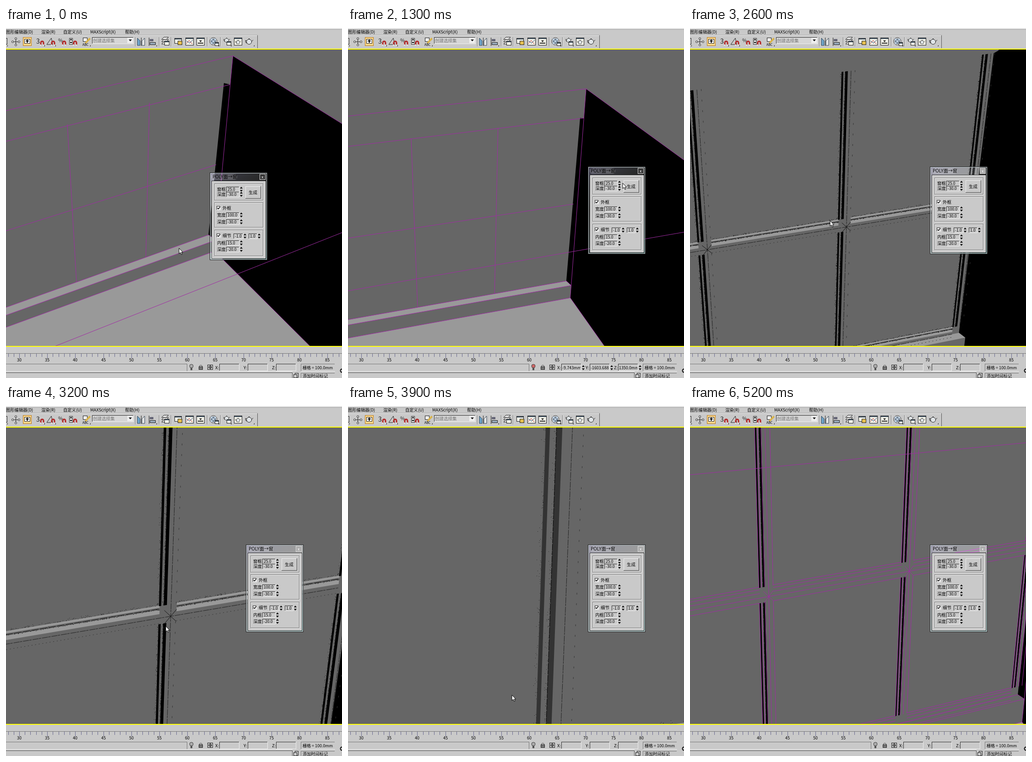
An HTML page with a canvas that plays this animation: 734 px wide and 763 px high, repeating every 5.3 s.

```html
<!DOCTYPE html>
<html>
<head>
<meta charset="utf-8">
<style>
html, body { margin: 0; width: 100%; height: 100%; overflow: hidden; background: #c9c9c9; }
canvas { display: block; }
</style>
</head>
<body>
<canvas id="stage" width="734" height="763"></canvas>
<script>
const c = document.getElementById('stage').getContext('2d');
const LOOP = 5300, BUILT = 1700, DESELECTED = 2400, EDGES_ON = 4900;
const PURPLE = '#a02ca4', FACE = '#c9c9c9', WALL = '#666', LIGHT = '#999', INK = '#222';
const FONT = '"Noto Sans CJK SC", "Noto Sans CJK", "Noto Sans", sans-serif';

// Window corners TL, TR, BL, BR on screen, then the guide line's height at both stage edges
const views = [
  [134,210, 476,120, 154,554, 445,450, 736,446],
  [128,209, 512,189, 142,600, 489,569, 411,360],
  [138,241, 507,196, 152,609, 480,551, 573,445],
  [-108,28, 820,-86, -38,929, 705,776, 573,445],
  [-478,-130, 1412,-330, -358,1750, 1172,1480, 150,80],
  [250,16, 1030,-4, 252,739, 930,722, 150,80],
  [163,10, 790,-55, 180,760, 721,628, 150,80]
];
const camera = [[0,0],[700,1],[900,1],[1250,2],[2000,2],[3200,3],[3900,4],[4500,5],[5200,6]]
  .map(([t, i]) => [t, ...views[i]]);
const pointer = [[0,378,480],[700,487,327],[900,566,314],[1500,617,350],[1700,617,350],
  [2000,262,359],[3200,349,480],[3900,358,630],[4500,319,416],[LOOP,319,416]];

const clamp = (v, a = 0, b = 1) => Math.min(b, Math.max(a, v));

function sample(keys, t) {
  let i = 0;
  while (i < keys.length - 2 && keys[i + 1][0] <= t) i++;
  const a = keys[i], b = keys[i + 1], k = clamp((t - a[0]) / (b[0] - a[0]));
  return a.slice(1).map((v, j) => v + (b[j + 1] - v) * k);
}

// Maps plane coordinates (u 0..2, v -1..1) onto the screen quad
function projector([x0, y0, x1, y1, x3, y3, x2, y2]) {
  const dx1 = x1 - x2, dx2 = x3 - x2, sx = x0 - x1 + x2 - x3;
  const dy1 = y1 - y2, dy2 = y3 - y2, sy = y0 - y1 + y2 - y3;
  const det = dx1 * dy2 - dx2 * dy1;
  const g = (sx * dy2 - dx2 * sy) / det, h = (dx1 * sy - sx * dy1) / det;
  return (u, v) => {
    const a = u / 2, b = (v + 1) / 2, w = g * a + h * b + 1;
    return [((x1 - x0 + g * x1) * a + (x3 - x0 + h * x3) * b + x0) / w,
            ((y1 - y0 + g * y1) * a + (y3 - y0 + h * y3) * b + y0) / w];
  };
}

function trace(pts) {
  c.beginPath();
  pts.forEach(p => c.lineTo(p[0], p[1]));
}
function fill(color, ...pts) { trace(pts); c.fillStyle = color; c.fill(); }
function line(color, dash, ...pts) {
  trace(pts);
  c.setLineDash(dash); c.strokeStyle = color; c.lineWidth = 1; c.stroke(); c.setLineDash([]);
}
function circle(x, y, r, color, stroke) {
  c.beginPath(); c.arc(x, y, r, 0, 7);
  if (color) { c.fillStyle = color; c.fill(); }
  if (stroke) { c.lineWidth = 1; c.strokeStyle = stroke; c.stroke(); }
}
function rect(color, x, y, w, h) { c.fillStyle = color; c.fillRect(x, y, w, h); }
function frame(color, x, y, w, h) { c.strokeStyle = color; c.lineWidth = 1; c.strokeRect(x + .5, y + .5, w - 1, h - 1); }
function box(color, x, y, w, h) { rect(color, x, y, w, h); frame(INK, x, y, w, h); }
function text(s, x, y, size = 9, color = '#000') {
  c.font = size + 'px ' + FONT; c.fillStyle = color; c.fillText(s, x, y);
}
function sunken(x, y, w, h, color = FACE) {
  rect('#eee', x, y, w + 1, h + 1); rect('#333', x, y, w, h); rect(color, x + 1, y + 1, w - 1, h - 1);
}
function place(x, y, paint) {
  c.save(); c.translate(Math.round(x), Math.round(y)); paint(); c.restore();
}

function drawBar(at, spans, vertical, s) {
  const along = (color, o, a, b, dash = []) => line(color, dash, at(o, a), at(o, b));
  const strip = (color, o, w, a, b) => fill(color, at(o, a), at(o + w, a), at(o + w, b), at(o, b));
  for (const [a, b] of spans) {
    if (vertical) {
      strip(s.shade, -.064, s.width * .75, a, b);
      strip(s.shade, -.038, s.width, a, b);
      along('#000', -.038, a, b, [9, 2, 14, 1]);
    } else if (s.lit) {
      strip(LIGHT, -.063, .011, a, b);
      strip(LIGHT, -.041, .021, a, b);
      along('#111', -.046, a, b, [16, 3]);
    } else if (!s.wire) {
      along(LIGHT, -.052, a, b, [28, 15]);
      along('#111', -.032, a, b, [17, 5]);
      along('#111', .034, a, b, [20, 14]);
    }
    if (s.wire) [-.064, -.048, -.026, .03].forEach(o => along(PURPLE, o, a, b));
    else along('#333', .027, a, b, vertical ? [4, 19] : [2, 6]);
    if (s.selected) along('#fff', -.066, a, b, [12, 2, 5, 2]);
    if (s.lit && !s.wire) speckle(at, a, b);
  }
  along(s.wire ? PURPLE : INK, 0, spans[0][0], spans[spans.length - 1][1], s.wire ? [] : [13, 1, 5, 2]);
}

function speckle(at, a, b) {
  let seed = 91;
  const random = () => (seed = seed * 16807 % 2147483647) / 2147483647;
  for (let i = 0; i < 260; i++) {
    const [x, y] = at((i % 2 ? -.064 : -.04) - random() * random() * .012, a + (b - a) * random());
    rect(INK, x | 0, y | 0, 1, 1);
  }
}

function drawView(t) {
  const v = sample(camera, t), at = projector(v);
  const tilt = (v[3] - v[1]) / (v[2] - v[0]);
  const grey = clamp((v[2] - v[0] - 1000) / 17, 0, 51);
  const s = { width: .13 * Math.abs(tilt), shade: `rgb(${grey},${grey},${grey})`, lit: t < 4300,
    wire: t < DESELECTED || t >= EDGES_ON, selected: t >= BUILT && t < DESELECTED };

  // Depth lines meet at a vanishing point that follows the camera tilt
  const vanish = [245 + 3786 * tilt, -135 + 2196 * tilt];
  const toward = (p, k) => p.map((n, i) => n + (n - vanish[i]) * k);
  const front = (u, v) => toward(at(u, v), .0108);
  const far = -1.6;
  const top = front(2, -1.34), notch = front(2, -1.03), lip = front(2, 1), foot = front(2, 1.17);
  const back = toward(top, 4), floor = toward(foot, 4);
  const jamb = 1.98, jambTop = at(2, -1), jambEnd = at(jamb, 1);

  c.save();
  c.beginPath(); c.rect(0, 47, 734, 646); c.clip();
  rect(WALL, 0, 47, 734, 646);
  fill(LIGHT, front(far, 1.17), foot, floor, [-600, floor[1]]);
  fill('#000', top, back, floor, foot, lip, jambEnd, jambTop, notch);
  if (s.lit) fill(LIGHT, at(far, 1), jambEnd, lip, front(far, 1));

  if (t >= BUILT) {
    const across = [[far, -.06], [.03, .94], [1.03, 1.92]];
    const up = [[-1, -.06], [.03, .94]];
    for (const y of [0, 1]) drawBar((o, a) => at(a, y + o), across, false, s);
    for (const x of [0, 1, jamb]) drawBar((o, a) => at(x + o, a), up, true, s);
    for (const x of [0, 1]) for (const side of [-1, 1])
      line(s.wire ? PURPLE : '#111', [], at(x - .035, -.035 * side), at(x + .03, .03 * side));
  } else {
    for (const x of [0, 1]) line(PURPLE, [], at(x, -1), at(x, 1));
    line(PURPLE, [], at(far, 0), at(2, 0));
  }
  if (s.wire) [
    [at(far, -1.3), top, back], [at(far, -1), notch], [top, notch, lip, foot, floor],
    [at(far, 1), jambEnd, lip], [front(far, 1), lip], [front(far, 1.17), foot],
    [[0, v[8]], [734, v[9]]]
  ].forEach(path => line(PURPLE, [], ...path));
  if (s.selected) place(...at(0, 0), drawGizmo);
  c.restore();
}

function drawGizmo() {
  const arrow = (color, name, x, y) => {
    const n = Math.hypot(x, y), dx = x / n, dy = y / n, bx = x - dx * 18, by = y - dy * 18;
    line(color, [], [-3, 3], [bx, by]);
    fill(color, [x, y], [bx - dy * 4, by + dx * 4], [bx + dy * 4, by - dx * 4]);
    text(name, x + dx * 4 - 3, y + dy * 4 + 2, 9, color);
  };
  fill('#a69b4a', [-24, 4], [3, 2], [7, 12], [-18, 15]);
  line('#e8d800', [], [-60, 7], [3, 2], [7, 12], [-18, 15], [-24, 4]);
  line('#d00', [], [-24, 3], [-24, -17]);
  line('#00e', [], [-24, -17], [-1, -22], [7, -5]);
  arrow('#00e', 'z', -2, -66); arrow('#c00', 'x', -71, 9); arrow('#090', 'y', 22, 34);
}

function spinner(x, y) {
  fill('#111', [x, y + 4], [x + 3, y], [x + 6, y + 4]);
  fill('#111', [x, y + 7], [x + 3, y + 11], [x + 6, y + 7]);
}
function field(value, x, y, w = 28) {
  sunken(x, y, w, 11);
  text(value, x + 3, y + 9, 8.5);
  spinner(x + w + 2, y);
}
function row(label, value, y) { text(label, 16, y + 9, 9.5); field(value, 36, y); }
function check(label, y) {
  sunken(15, y, 8, 8, '#e8e8e8');
  line('#000', [], [17, y + 4], [19, y + 6], [23, y + 1]);
  line('#000', [], [17, y + 5], [19, y + 7], [23, y + 2]);
  text(label, 28, y + 8, 9.5);
}
function drawDialog(t) {
  c.globalCompositeOperation = 'color-dodge';
  rect('#444', 0, 0, 126, 191);
  c.globalCompositeOperation = 'source-over';
  rect('rgba(255,255,255,.15)', 0, 0, 126, 191);
  const tint = c.createLinearGradient(0, 0, 126, 191);
  tint.addColorStop(0, 'rgba(150,140,225,.25)');
  tint.addColorStop(.35, 'rgba(130,150,160,0)');
  tint.addColorStop(1, 'rgba(90,200,190,.4)');
  rect(tint, 0, 0, 126, 191);
  frame(INK, 0, 0, 126, 191); frame('#bfc9cc', 1, 1, 124, 189);
  c.fillStyle = 'rgba(255,255,255,.2)';
  c.beginPath(); c.roundRect(4, 3, 56, 13, 6); c.fill();
  text('POLY面→窗', 6, 13, 10);
  rect(t < DESELECTED ? '#333' : '#aaa', 109, 4, 12, 11); frame('#ddd', 109, 3, 13, 13);
  text('x', 113, 13, 9, '#fff');
  rect('#333', 4, 18, 119, 170); rect('#eee', 5, 19, 117, 168); rect(FACE, 6, 20, 115, 166);
  for (const [y, h] of [[24, 37], [65, 55], [125, 57]]) {
    frame('#eee', 11, y + 1, 107, h); frame('#777', 10, y, 107, h);
  }
  row('窗框', '25.0', 31); row('深度', '-30.0', 42);
  rect('#444', 78, 30, 34, 27); rect('#eee', 78, 30, 33, 26); rect(FACE, 79, 31, 32, 25);
  text('生成', 85, 47, 9.5);
  check('外框', 73); row('宽度', '100.0', 87); row('深度', '-30.0', 102);
  check('细节', 133); field('-1.0', 52, 133, 20); field('1.0', 85, 133, 18);
  row('内框', '15.0', 148); row('深度', '-20.0', 162);
}

function magnet(x) {
  const y = 32;
  c.lineWidth = 3; c.strokeStyle = '#b22a2a';
  c.beginPath(); c.moveTo(x - 3, y + 5); c.arc(x, y, 3, Math.PI, 0); c.lineTo(x + 3, y + 5); c.stroke();
  for (const side of [-3, 3]) rect('#eee', x + side - 2, y + 4, 3, 2);
}
function teapot(x, y, s) {
  place(x, y, () => {
    c.scale(s, s);
    circle(0, 0, 5.5, '#e0e5e8', INK);
    line(INK, [], [5, 0], [9, -4]);
    line(INK, [], [-5, -2], [-8, -3], [-7, 2], [-4, 3]);
    rect(INK, -1, -7, 2, 2);
  });
}
function panel(x, y = 21, w = 18, h = 17) { box('#f2f2e8', x, y, w, h); rect('#456', x + 1, y + 1, w - 2, 2); }
function drawToolbar() {
  rect(FACE, 0, 0, 734, 47);
  rect('#eee', 0, 0, 734, 2); rect('#b5b5b5', 0, 2, 734, 2);
  [['图形编辑器(D)', 0], ['渲染(R)', 77], ['自定义(U)', 125], ['MAXScript(X)', 184], ['帮助(H)', 260]]
    .forEach(([s, x]) => text(s, x, 12, 9.3));
  rect('#aaa', 0, 15, 550, 1); rect('#eee', 0, 16, 550, 1); rect('#555', 549, 16, 1, 28);
  for (const x of [282, 334, 360, 439, 468]) { rect('#777', x, 20, 1, 20); rect('#eee', x + 1, 20, 1, 20); }
  for (const x of [2, 83, 107, 183, 328, 464, 491, 541]) fill(INK, [x, 40], [x + 2, 37], [x + 2, 40]);

  frame('#333', -6, 22, 9, 14);
  line(INK, [], [14, 30], [29, 30]); line(INK, [], [21.5, 23], [21.5, 37]);
  for (let i = 0; i < 4; i++) circle(21.5 + 7 * Math.cos(i * Math.PI / 2), 30 + 7 * Math.sin(i * Math.PI / 2), 2, '#eee', INK);
  rect('#ffd88a', 37, 20, 19, 19); frame('#b5781c', 37, 20, 19, 19);
  box('#fff', 40, 24, 13, 10);
  fill(INK, [46.5, 25], [51, 29], [42, 29]); rect(INK, 45, 29, 3, 3);
  text('3', 66, 34, 14, INK); text('%', 114, 31, 11, INK);
  line(INK, [], [89, 36], [99, 22], [102, 36], [89, 36]);
  box('#fff', 138, 22, 8, 14); spinner(139, 23);
  [79, 103, 127, 151].forEach(magnet);
  box('#eee', 168, 21, 10, 9);
  fill('#d8b34a', [172, 32], [182, 21], [185, 24], [175, 34]); text('ABC', 167, 39, 7);
  sunken(188, 20, 90, 14, '#d6d6d6'); text('创建选择集', 190, 31, 9.5, '#777');
  rect('#eee', 265, 21, 12, 12); fill('#111', [268, 25], [275, 25], [271.5, 29]);

  for (const side of [-1, 1]) {
    const x = 295 + side * 2, out = x + side * 6, shape = [[out, 22], [x, 28], [x, 38], [out, 38], [out, 22]];
    fill(side < 0 ? '#6fa4c9' : '#e6e6e6', ...shape); line('#345', [], ...shape);
  }
  rect(INK, 295, 21, 1, 18); rect(INK, 312, 21, 1, 18);
  rect('#667', 314, 24, 8, 5); box('#9ab', 314, 31, 13, 6);
  for (let y = 35; y > 20; y -= 5) {
    const sheet = [[340, y], [345, y - 5], [355, y - 5], [350, y], [340, y]];
    fill('#e8e8e8', ...sheet); line(INK, [], ...sheet);
  }
  panel(346, 28, 11, 10);
  panel(368, 22, 16, 12); box('#e3bd50', 375, 28, 10, 9);
  panel(392); line('#b33', [], [394, 34], [400, 27], [407, 35]); line('#247', [], [394, 28], [401, 33], [408, 26]);
  panel(416); rect(INK, 419, 32, 12, 2); fill(INK, [422, 27], [428, 27], [425, 31]);
  circle(453, 29, 8, '#eee', '#333');
  for (let i = 0; i < 9; i++) rect(i % 2 ? '#789' : '#bcd', 447 + i % 3 * 4, 23 + (i / 3 | 0) * 4, 4, 4);
  panel(456, 31, 9, 8);
  teapot(482, 27, .8); panel(482, 29, 10, 9);
  panel(498); teapot(507, 31, .7); teapot(531, 30, 1);
}

function drawStatus(t) {
  const active = t >= 1100 && t < DESELECTED;
  rect(FACE, 0, 693, 734, 70);
  rect('#ff0', 0, 45, 734, 2); rect('#ff0', 0, 693, 734, 2);
  rect('#777', 0, 709, 734, 1);
  for (let i = -2; i < 59; i++) {
    const x = Math.round(29 + i * 12.24);
    rect('#6a6a90', x, 710, 1, i % 5 ? 7 : 10);
    if (i >= 0 && i % 5 === 0) text(30 + i, x - 5, 727);
  }
  rect('#777', 0, 732, 395, 1); rect('#777', 395, 732, 1, 16); rect('#eee', 0, 748, 626, 1);
  rect('#555', 0, 751, 625, 1); rect('#555', 625, 751, 1, 12);
  circle(405, 737, 4, active ? '#c66' : '#aaa', '#444'); rect('#555', 403, 741, 4, 5);
  circle(425.5, 738, 3, null, '#444'); box('#777', 421, 738, 9, 7);
  frame(INK, 440, 734, 12, 11); circle(446, 739.5, 3, null, INK);
  rect(INK, 442, 739, 8, 1); rect(INK, 446, 735, 1, 9);
  ['X:-9.743mm', 'Y:-1603.688m', 'Z:1350.0mm'].forEach((s, i) => {
    const x = 457 + i * 62.3 | 0;
    text(s.slice(0, 2), x, 744, 9.5);
    sunken(x + 9, 732, 43, 15);
    if (!active) return;
    c.save(); c.beginPath(); c.rect(x + 10, 733, 41, 14); c.clip();
    text(s.slice(2), x + 11, 744, 8.8);
    c.restore();
    spinner(x + 54, 735);
  });
  for (const y of [732, 752]) { rect('#777', 644, y, 74, 1); rect('#777', 644, y, 1, 16); rect('#eee', 644, y + 16, 75, 1); }
  text('栅格 = 100.0mm', 648, 744); text('添加时间标记', 648, 762, 9.2);
  frame(INK, 631, 752, 8, 10); box(FACE, 628, 755, 8, 8);
  circle(734, 747, 4.5, '#111'); circle(734, 747, 2.5, FACE);
}

function drawPointer() {
  const arrow = [[0, 0], [0, 12], [3, 9.5], [5, 14], [7, 13], [5, 9], [8.5, 9], [0, 0]];
  fill('#fff', ...arrow); line('#000', [], ...arrow);
}

function draw(now) {
  const t = Math.floor(now % LOOP / 100) * 100;
  const drag = clamp((t - 700) / 200);
  drawView(t);
  drawToolbar();
  drawStatus(t);
  place(445 + 79 * drag, 315 - 13 * drag, () => drawDialog(t));
  if (t < EDGES_ON) place(...sample(pointer, t), drawPointer);
  requestAnimationFrame(draw);
}
requestAnimationFrame(draw);
</script>
</body>
</html>
```
